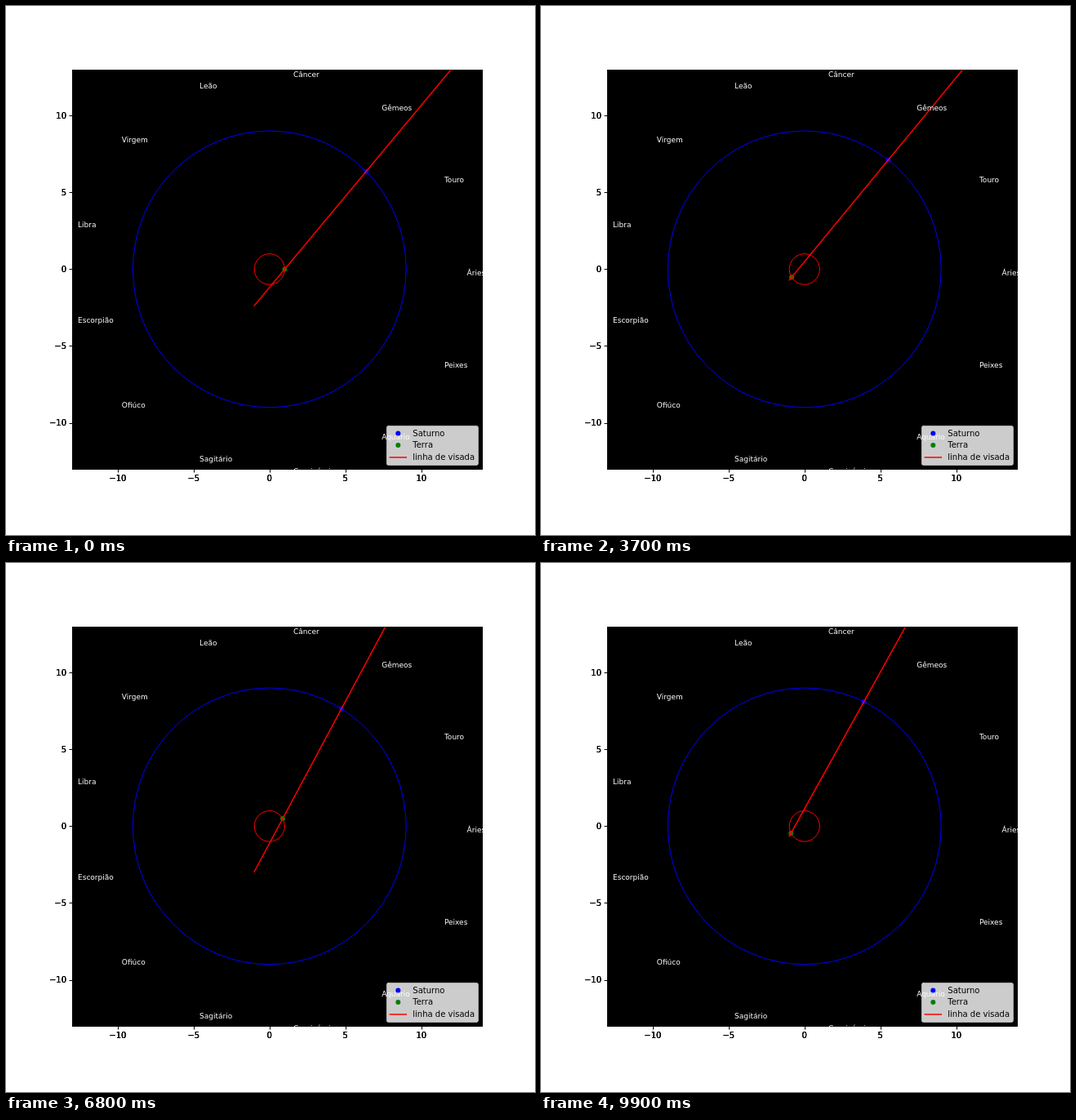
Write an HTML page with a canvas that moves like this. It is 648 px wide and 648 px high and loops after 10000 ms.

```html
<!DOCTYPE html>
<html lang="pt">
<head>
<meta charset="utf-8">
<title>Linha de visada</title>
<style>
html, body { margin: 0; width: 100%; height: 100%; overflow: hidden; background: #fff; }
canvas { display: block; }
</style>
</head>
<body>
<canvas id="stage" width="648" height="648"></canvas>
<script>
const ctx = document.getElementById('stage').getContext('2d');
const TAU = Math.PI * 2;
const FONT = '"DejaVu Sans", sans-serif';
const STEP_MS = 100, STEPS = 100;
const BOX = { x: 81, y: 78, w: 503, h: 490 };
const SIGNS = ['Áries', 'Touro', 'Gêmeos', 'Câncer', 'Leão', 'Virgem', 'Libra',
  'Escorpião', 'Ofiúco', 'Sagitário', 'Capricórnio', 'Aquário', 'Peixes'];
const TICKS = [-10, -5, 0, 5, 10];

// data units to pixels
const SX = 18.6, SY = 18.817;
const px = x => 322.8 + x * SX;
const py = y => 322.38 - y * SY;
const polar = (r, a) => ({ x: r * Math.cos(a), y: r * Math.sin(a) });

function text(str, x, y, size, color, align = 'left') {
  ctx.font = `${size}px ${FONT}`;
  ctx.fillStyle = color;
  ctx.textAlign = align;
  ctx.fillText(str, x, y);
}

function dot(x, y, color) {
  ctx.fillStyle = color;
  ctx.beginPath();
  ctx.arc(x, y, 3, 0, TAU);
  ctx.fill();
}

function orbit(r, color) {
  ctx.strokeStyle = color;
  ctx.lineWidth = 1;
  ctx.beginPath();
  ctx.ellipse(px(0), py(0), r * SX, r * SY, 0, 0, TAU);
  ctx.stroke();
}

function redLine(x1, y1, x2, y2) {
  ctx.strokeStyle = '#f00';
  ctx.lineWidth = 1.5;
  ctx.lineCap = 'square';
  ctx.beginPath();
  ctx.moveTo(x1, y1);
  ctx.lineTo(x2, y2);
  ctx.stroke();
}

function drawSky(step) {
  const earth = polar(1, step * 0.1);
  const saturn = polar(9, Math.PI / 4 + step * 0.1 / 29.5);
  const slope = (saturn.y - earth.y) / (saturn.x - earth.x);
  const sightY = x => py(earth.y + slope * (x - earth.x));

  ctx.save();
  ctx.beginPath();
  ctx.rect(BOX.x, BOX.y, BOX.w, BOX.h);
  ctx.clip();
  ctx.fillStyle = '#000';
  ctx.fillRect(BOX.x, BOX.y, BOX.w, BOX.h);
  dot(px(saturn.x), py(saturn.y), '#00f');
  dot(px(earth.x), py(earth.y), '#008000');
  orbit(9, '#00f');
  orbit(1, '#f00');
  redLine(px(-1), sightY(-1), px(16), sightY(16));
  ctx.restore();

  ctx.strokeStyle = '#000';
  ctx.lineWidth = 0.8;
  ctx.strokeRect(BOX.x + 0.5, BOX.y + 0.5, BOX.w - 1, BOX.h - 1);

  SIGNS.forEach((name, i) => {
    const p = polar(13, i * TAU / SIGNS.length);
    text(name, px(p.x), py(p.y) + 7.3, 9, '#fff');
  });
}

function drawTicks() {
  for (const v of TICKS) {
    const label = String(v).replace('-', '\u2212');
    const x = Math.round(px(v)), y = Math.round(py(v));
    ctx.fillStyle = '#000';
    ctx.fillRect(x, 568, 1, 3.5);
    ctx.fillRect(77.5, y, 3.5, 1);
    // repeated passes give the heavy edges of the labels
    for (let i = 0; i < 3; i++) {
      text(label, px(v), 581.7, 10, '#000', 'center');
      text(label, 74, py(v) + 3.7, 10, '#000', 'right');
    }
  }
}

function drawLegend() {
  ctx.beginPath();
  ctx.roundRect(466.4, 514.4, 112, 48, 2);
  ctx.fillStyle = 'rgba(255,255,255,0.8)';
  ctx.fill();
  ctx.strokeStyle = 'rgba(204,204,204,0.8)';
  ctx.lineWidth = 1;
  ctx.stroke();
  dot(480.3, 523.4, '#00f');
  dot(480.3, 538.1, '#008000');
  redLine(470.3, 552.9, 490.3, 552.9);
  ['Saturno', 'Terra', 'linha de visada'].forEach((label, i) =>
    text(label, 498.3, 526.5 + i * 14.7, 10, '#000'));
}

function draw(step) {
  ctx.fillStyle = '#fff';
  ctx.fillRect(0, 0, 648, 648);
  drawSky(step);
  drawTicks();
  drawLegend();
}

const start = performance.now();
function tick() {
  draw(Math.floor((performance.now() - start) / STEP_MS) % STEPS);
  requestAnimationFrame(tick);
}
tick();
</script>
</body>
</html>
```
